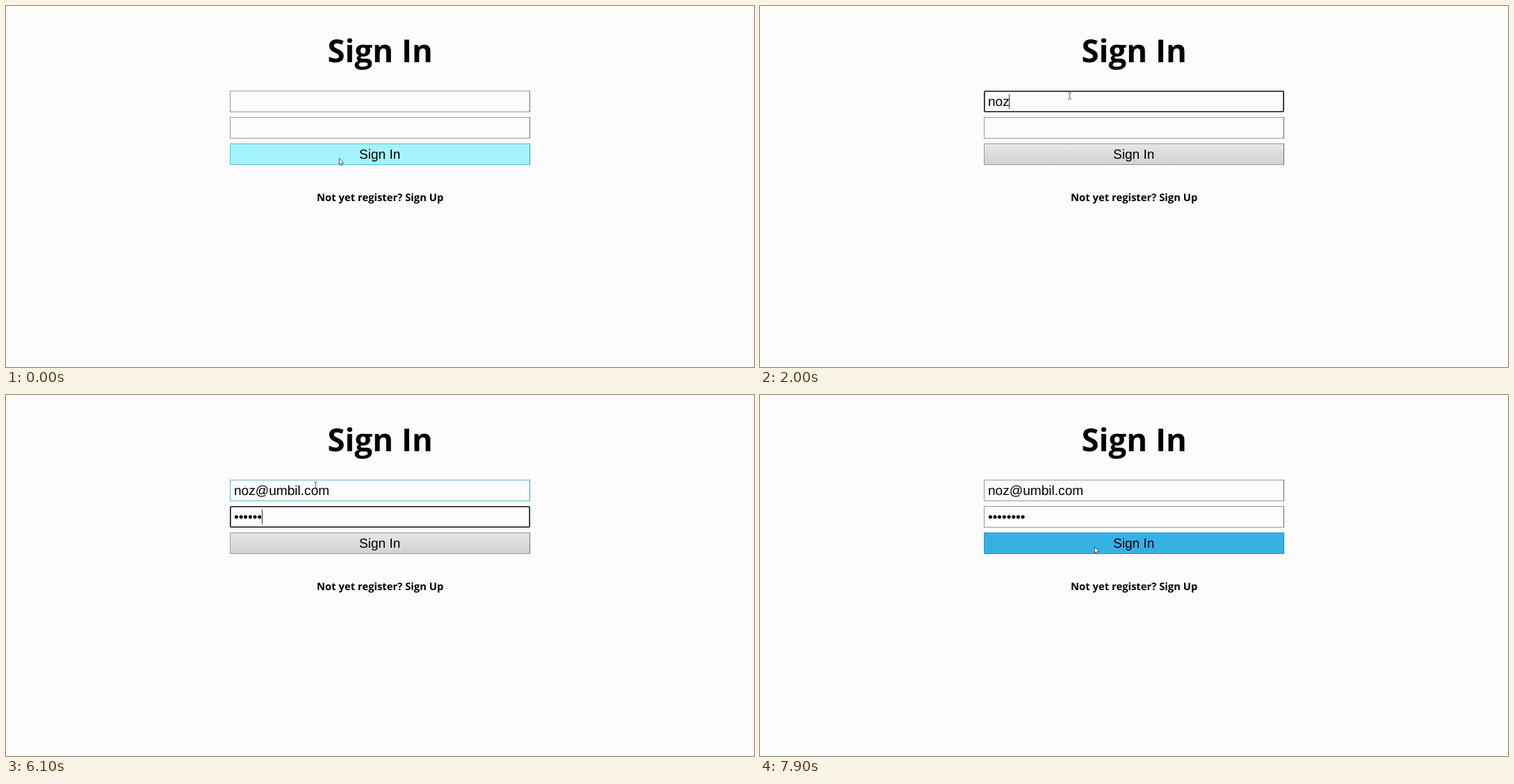
An HTML page for the animation above (8000 ms loop, 1076 by 520 pixels).

```html
<!DOCTYPE html>
<html lang="en">
<head>
<meta charset="utf-8">
<title>Sign In</title>
<style>
  html, body { margin: 0; width: 100%; height: 100%; overflow: hidden; background: #fcfcfc; }
  svg { display: block; width: 1076px; height: 520px; }
  text { font-family: "Liberation Sans", Arial, sans-serif; font-size: 19.1px; text-rendering: geometricPrecision; white-space: pre; }
  .bold { font-family: "Open Sans", "Noto Sans", sans-serif; font-weight: 700; }
  .mid { text-anchor: middle; }
  .box { fill: none; stroke: #989898; }
  .edge { stroke: #6a6a6a; }
  .ring { fill: none; stroke: #101010; stroke-width: 1.6; display: none; }
  .hover .box { stroke: #5bb8dc; }
  .hover .edge { stroke: #2f9dcb; }
  .focus .box, .focus .edge { display: none; }
  .focus .ring { display: inline; }
  .button .box { fill: url(#grey); }
  .button.hover .box { fill: #a5f3fb; stroke: #52bfe0; }
  .button.press .box { fill: #35b1e4; stroke: #2795c8; }
  .button.press .edge { stroke: #1c7fb0; }
  .caret { stroke: #333; }
</style>
</head>
<body>
<svg viewBox="0 0 1076 520">
  <defs>
    <linearGradient id="grey" x1="0" y1="0" x2="0" y2="1">
      <stop offset="0" stop-color="#e7e7e7"/>
      <stop offset="1" stop-color="#d2d2d2"/>
    </linearGradient>
  </defs>
  <text class="bold mid" x="538.2" y="81" style="font-size:45.5px">Sign In</text>
  <g id="form"></g>
  <text class="mid" x="537.7" y="219.8">Sign In</text>
  <text class="bold mid" x="538.2" y="281.2" style="font-size:14.8px">Not yet register? Sign Up</text>
  <path id="beam" d="M-2.5 -4.5H-.5M.5 -4.5H2.5M0 -4V4M-2.5 4.5H-.5M.5 4.5H2.5" fill="none" stroke="#444" stroke-width=".9"/>
  <path id="arrow" d="M.4 .4V9.6L2.5 7.6L4 10.9L5.4 10.3L4 7.1H6.6Z" fill="#fff" stroke="#333" stroke-width=".8"/>
</svg>
<script>
const LOOP = 8000;
const EMAIL = "noz@umbil.com";
const LEFT = 328;
const $ = id => document.getElementById(id);

const form = $("form");
form.innerHTML = [122, 160, 198].map((y, i) => `
  <g class="${i < 2 ? "field" : "button"}">
    <rect class="box" x="322.5" y="${y + 0.5}" width="431" height="30"/>
    <path class="edge" d="M753.5 ${y}v31"/>
    ${i < 2 ? `
    <rect class="ring" x="322.8" y="${y + 0.8}" width="430.4" height="29.4" rx="1.5"/>
    <text x="${LEFT}" y="${y + 22.3}"></text>
    <path class="caret" d="M0 ${y + 5}v21"/>` : ""}
  </g>`).join("");
const rows = [...form.children];

// Each step changes part of the state: hover and focus are row numbers, at is the pointer.
const steps = [
  [0, { hover: 2, focus: -1, press: false, caret: false, mail: 0, dots: 0, arrow: true, at: [479, 219] }],
  [550, { hover: 1, arrow: false, at: [451.5, 157] }],
  [600, { hover: 0, at: [446.5, 138] }],
  [750, { at: [445.5, 129.5] }],
  [900, { focus: 0, caret: true }],
  [1400, { caret: false }],
  ...typing("mail", [1600, 1800, 2000, 2350, 2700, 2850, 3000, 3200, 3350, 3500, 3700, 3850, 4050]),
  [4350, { focus: 1, caret: true }],
  [4750, { caret: false }],
  ...typing("dots", [4950, 5150, 5400, 5600, 5850, 6100, 6300, 6550]),
  [7100, { caret: false }],
  [7200, { at: [449.5, 142] }],
  [7300, { hover: -1, at: [460.5, 170] }],
  [7400, { at: [471.5, 192] }],
  [7500, { caret: true, arrow: true, at: [478, 210] }],
  [7600, { hover: 2, at: [481, 218.5] }],
  [7900, { focus: -1, press: true, caret: false }]
];

function typing(key, times) {
  return times.map((t, i) => [t, { [key]: i + 1, caret: true }]);
}

function place(el, shown, [x, y]) {
  el.style.display = shown ? "" : "none";
  el.setAttribute("transform", `translate(${x} ${y})`);
}

function draw(time) {
  const s = Object.assign({}, ...steps.filter(([t]) => t <= time).map(([, change]) => change));
  const values = [EMAIL.slice(0, s.mail), "•".repeat(s.dots)];

  rows.forEach((row, i) => {
    row.classList.toggle("hover", s.hover === i);
    row.classList.toggle("focus", s.focus === i);
    row.classList.toggle("press", s.press);
    if (i > 1) return;
    const text = row.querySelector("text");
    const caret = row.querySelector(".caret");
    text.textContent = values[i];
    const width = values[i] ? text.getComputedTextLength() : 0;
    place(caret, s.focus === i && s.caret, [Math.floor(LEFT + width) + 0.5, 0]);
  });

  place($("beam"), !s.arrow, s.at);
  place($("arrow"), s.arrow, s.at);
}

const start = performance.now();
function tick() {
  draw((performance.now() - start) % LOOP);
  requestAnimationFrame(tick);
}
tick();
</script>
</body>
</html>
```
